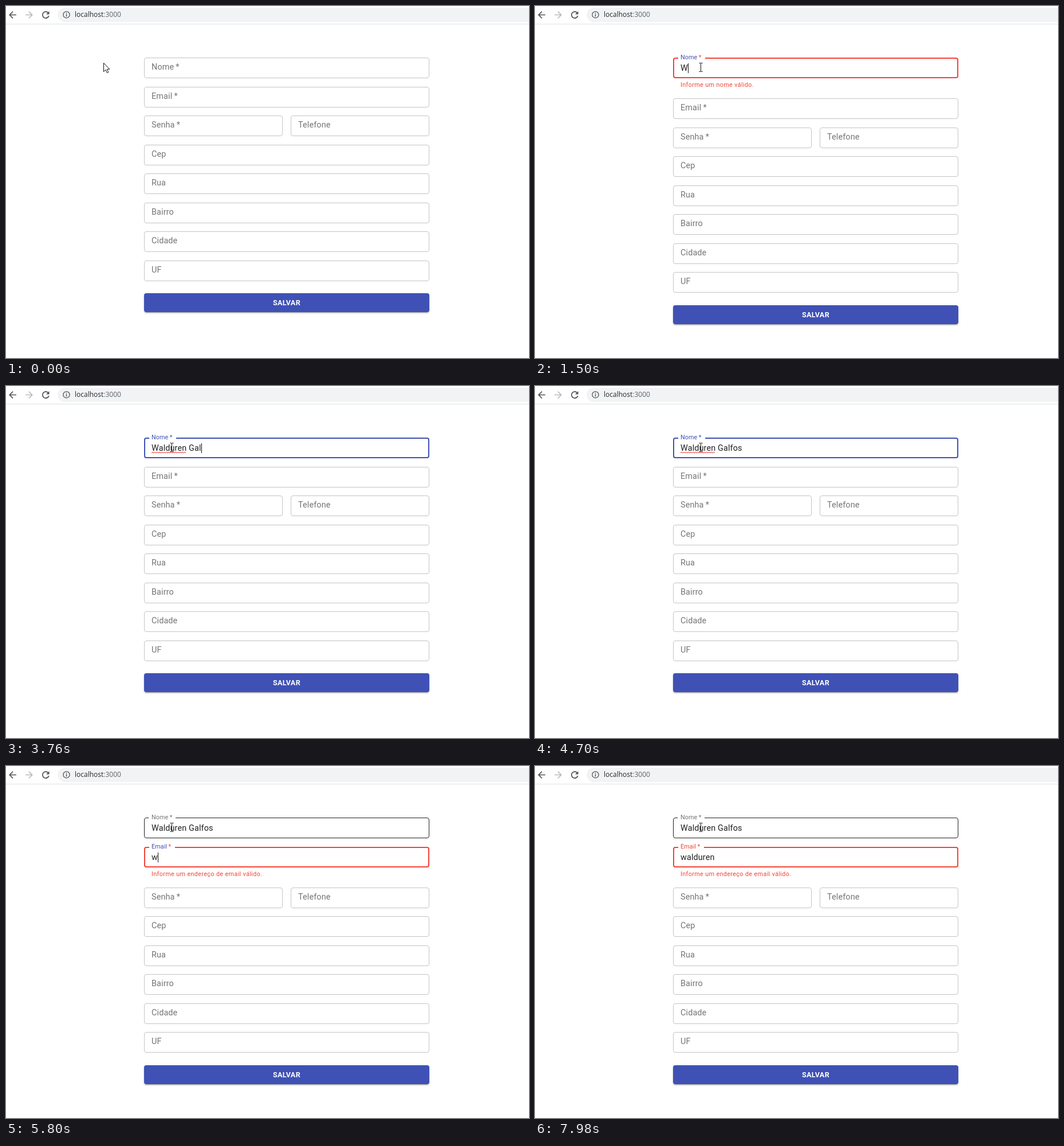
Recreate the animation shown at these times as an HTML page. Size 913 px wide and 614 px high, loop 8 s.

```html
<!DOCTYPE html>
<html lang="pt-BR">
<head>
<meta charset="utf-8">
<title>Cadastro</title>
<style>
html, body { margin: 0; width: 100%; height: 100%; overflow: hidden; background: #fff; }
body { position: relative; font-family: Roboto, Arial, sans-serif; }
.bar { position: absolute; left: 0; top: 0; width: 100%; height: 31px; border-bottom: 1px solid #dfe1e4; }
.pill { position: absolute; left: 90px; right: -20px; top: 3px; height: 25px; border-radius: 13px; background: #f1f3f4; }
.url { position: absolute; left: 120px; top: 6px; font: 12px/18px "Open Sans", "Noto Sans", sans-serif; color: #26282b; white-space: pre; }
.url b { font-weight: 400; color: #5f6368; }
svg { position: absolute; left: 0; top: 0; overflow: visible; }
.field { position: absolute; height: 36px; }
.box { position: absolute; inset: 0; box-sizing: border-box; border: 1px solid #c4c4c4; border-radius: 4px; }
.gap { position: absolute; top: 0; height: 2px; background: #fff; }
.label { position: absolute; left: 0; top: 0; transform-origin: 0 0; white-space: pre;
  font-size: 14.4px; line-height: 14.4px; letter-spacing: .135px; }
.value { position: absolute; left: 13px; top: 10px; height: 17px; white-space: pre;
  font-size: 14.4px; line-height: 17px; letter-spacing: .135px; color: #212121; }
.caret { position: absolute; left: 100%; top: 0; width: 1px; height: 17px; background: #111; }
.wave { left: 13px; top: 24px; }
.help { position: absolute; left: 13px; top: 39px; white-space: pre; color: #f44336;
  font-size: 10.8px; line-height: 18px; letter-spacing: .36px; }
.save { position: absolute; left: 241px; width: 498px; height: 33px; border-radius: 4px;
  background: #3f51b5; color: #fff; text-align: center;
  font-size: 12.6px; font-weight: 700; line-height: 33px; letter-spacing: .36px;
  box-shadow: 0 3px 1px -2px rgba(0,0,0,.2), 0 2px 2px rgba(0,0,0,.14), 0 1px 4px rgba(0,0,0,.12); }
</style>
</head>
<body>
<div class="bar">
  <div class="pill"></div>
  <svg width="120" height="31">
    <g fill="#505357">
      <path transform="translate(1.9 5.9) scale(.8)" d="M20 11H7.8l5.6-5.6L12 4l-8 8 8 8 1.4-1.4L7.8 13H20z"/>
      <path transform="translate(50.1 5.9) scale(-.8 .8)" fill="#b9bbbe" d="M20 11H7.8l5.6-5.6L12 4l-8 8 8 8 1.4-1.4L7.8 13H20z"/>
      <path d="M75.5 9v5.4h-5.4z"/>
      <path d="M104.8 14.3h1.4v4.2h-1.4zM104.8 11.8h1.4v1.4h-1.4z"/>
    </g>
    <g fill="none" stroke="#505357">
      <path stroke-width="1.7" d="M73.6 11.8A5.6 5.6 0 1 0 74.8 17"/>
      <circle cx="105.5" cy="15.2" r="5.6" stroke-width="1.3"/>
    </g>
  </svg>
  <div class="url">localhost<b>:3000</b></div>
</div>
<div id="form"></div>
<svg id="arrow" width="14" height="22"><path d="M.5 .5v15l3.5-3.3 2.4 5.4 2.4-1-2.4-5.3h4.5z" fill="#fff" stroke="#111"/></svg>
<svg id="beam" width="8" height="18"><path d="M-3-7.5h2.4l.6.6.6-.6H3M-3 7.5h2.4L0 6.9l.6.6H3M0-7V7" fill="none" stroke="#111"/></svg>

<script>
const LOOP = 8000;
const GRAY = [117, 117, 117], BLUE = [63, 81, 181], RED = [244, 67, 54];
const FOCUS_NAME = 540, FOCUS_MAIL = 4870;
const LEFT = 241, TOP = 90.3, STEP = 50.5, HELP = 20.6;

const specs = [
  { text: 'Nome', req: 1, row: 0, gap: 47, value: 'Walduren Galfos',
    keys: [1500, 1670, 1820, 1970, 2140, 2290, 2460, 2690, 2920, 3300, 3530, 3760, 3930, 4000, 4170],
    focus: [FOCUS_NAME, FOCUS_MAIL], error: [1500, 1820], wave: [2920, FOCUS_MAIL],
    help: 'Informe um nome válido.',
    tints: [[FOCUS_NAME, BLUE], [1500, RED], [1820, BLUE], [FOCUS_MAIL, GRAY]] },
  { text: 'Email', req: 1, row: 1, gap: 45, value: 'walduren ',
    keys: [5800, 5950, 6120, 6270, 6500, 6670, 6820, 7050, 7370],
    focus: [FOCUS_MAIL, LOOP], error: [5800, LOOP], wave: [7370, 7960],
    help: 'Informe um endereço de email válido.',
    tints: [[FOCUS_MAIL, BLUE], [5800, RED]] },
  { text: 'Senha', req: 1, row: 2, width: 242 },
  { text: 'Telefone', row: 2, x: 497, width: 242 },
  ...['Cep', 'Rua', 'Bairro', 'Cidade', 'UF'].map((text, i) => ({ text, row: 3 + i }))
];

const byId = id => document.getElementById(id);
const within = (t, [from, to]) => t >= from && t < to;
const show = (el, on) => { el.style.visibility = on ? 'visible' : 'hidden'; };
const rgb = c => `rgb(${c.map(Math.round)})`;
const mix = (a, b, k) => a + (b - a) * k;
const clamp = k => Math.min(1, Math.max(0, k));

function add(parent, cls, text = '') {
  const el = document.createElement('div');
  el.className = cls;
  el.textContent = text;
  return parent.appendChild(el);
}

// cubic-bezier(0, 0, .2, 1)
function easeOut(x) {
  if (x <= 0 || x >= 1) return clamp(x);
  let lo = 0, hi = 1, u = .5;
  for (let i = 0; i < 24; i++) {
    u = (lo + hi) / 2;
    if (.6 * (1 - u) * u * u + u ** 3 < x) lo = u; else hi = u;
  }
  return 3 * (1 - u) * u * u + u ** 3;
}

function build(spec) {
  const root = add(byId('form'), 'field');
  root.style.left = (spec.x || LEFT) + 'px';
  root.style.width = (spec.width || 498) + 'px';
  const f = { ...spec, root, box: add(root, 'box') };
  if (f.keys) {
    f.gapEl = add(root, 'gap');
    f.gapEl.style.width = f.gap + 'px';
  }
  f.label = add(root, 'label', f.text);
  if (f.req) {
    f.star = document.createElement('span');
    f.star.textContent = '\u2009*';
    f.label.append(f.star);
  }
  if (f.keys) {
    f.valueEl = add(root, 'value');
    f.typed = document.createElement('span');
    f.valueEl.append(f.typed);
    f.caret = add(f.valueEl, 'caret');
    f.helpEl = add(root, 'help', f.help);
    root.insertAdjacentHTML('beforeend',
      `<svg class="wave" width="62" height="4"><path d="M0 3${'l2-2l2 2'.repeat(15)}" fill="none" stroke="#e8262a"/></svg>`);
    f.waveEl = root.lastChild;
  }
  return f;
}

const fields = specs.map(build);
const save = add(byId('form'), 'save', 'SALVAR');

function tintAt(f, t) {
  let c = GRAY;
  for (const [at, to] of f.tints || []) {
    const k = easeOut((t - at) / 200);
    c = c.map((v, i) => mix(v, to[i], k));
  }
  return c;
}

function drawInput(f, t, hover) {
  const focused = within(t, f.focus), bad = within(t, f.error);
  const open = t >= f.focus[0] + 50;
  const count = f.keys.filter(k => t >= k).length;
  const last = count ? f.keys[count - 1] : f.focus[0];
  f.box.style.borderWidth = focused ? '2px' : '1px';
  f.box.style.borderColor = bad ? rgb(RED) : focused ? rgb(BLUE) : hover ? '#212121' : '#c4c4c4';
  f.gapEl.style.left = focused ? '9px' : '8px';
  show(f.gapEl, open);
  f.star.style.color = bad ? rgb(RED) : 'inherit';
  f.typed.textContent = f.value.slice(0, count);
  show(f.caret, focused && Math.floor((t - last) / 500) % 2 === 0);
  show(f.waveEl, within(t, f.wave));
  show(f.helpEl, bad);
}

function drawMouse(t) {
  const k = clamp((t - 70) / 400), e = k * k * (3 - 2 * k);
  const x = mix(170, 289.5, e), y = mix(99, 107.5, e);
  const over = x >= LEFT;
  byId('arrow').style.transform = `translate(${Math.round(x - .4)}px, ${Math.round(y)}px)`;
  byId('beam').style.transform = `translate(${Math.floor(x) + .5}px, ${Math.floor(y)}px)`;
  show(byId('arrow'), !over);
  show(byId('beam'), over);
  return over;
}

function draw(t) {
  const over = drawMouse(t);
  let shift = 0, lastRow = 0;
  const push = row => fields.reduce((s, f) => s + (f.error && f.row < row && within(t, f.error) ? HELP : 0), 0);
  for (const f of fields) {
    shift = push(f.row);
    lastRow = f.row;
    f.root.style.top = Math.round(TOP + STEP * f.row + shift) + 'px';
    const k = f.focus ? easeOut((t - f.focus[0]) / 200) : 0;
    f.label.style.transform = `translate(13px, ${mix(10, -5, k)}px) scale(${mix(1, .75, k)})`;
    f.label.style.color = rgb(tintAt(f, t));
    if (f.keys) drawInput(f, t, over && f.row === 0);
  }
  save.style.top = Math.round(TOP + STEP * lastRow + 57.6 + shift) + 'px';
}

const start = performance.now();
function tick() {
  draw((performance.now() - start) % LOOP);
  requestAnimationFrame(tick);
}
tick();
</script>
</body>
</html>
```
